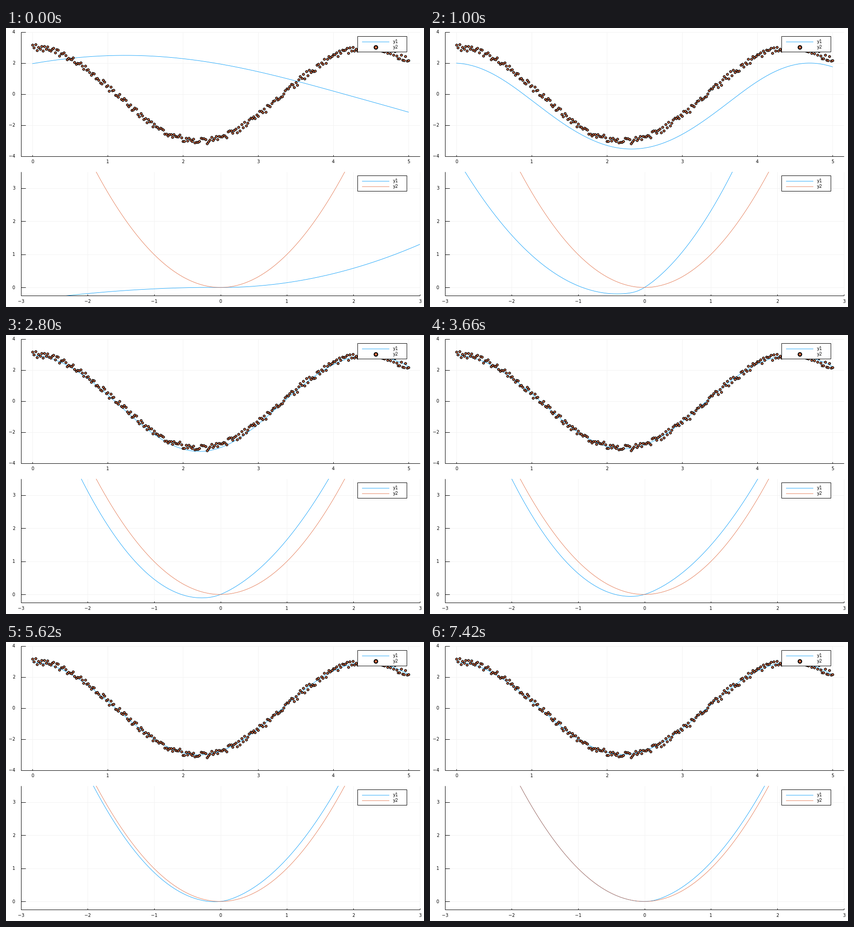
A matplotlib script for the animation above (7440 ms loop, 917x611 px).

```python
import numpy as np
import matplotlib.pyplot as plt
from matplotlib.animation import FuncAnimation
from matplotlib.collections import LineCollection
from matplotlib.patches import Rectangle

W, H, DPI = 917, 611, 64
PX = 72 / DPI
BLUE, ORANGE, GRID = "#009afa", "#e26f46", "#f2f2f2"
LEFT, RIGHT = 33, 908
CURVE_W = 0.85 * PX
TICK_MS, TICKS = 20, 372
STEPS = 160

plt.rcParams["font.family"] = "DejaVu Sans"
fig = plt.figure(figsize=(W / DPI, H / DPI), dpi=DPI, facecolor="white")
ax = fig.add_axes([0, 0, 1, 1])
ax.set_xlim(0, W)
ax.set_ylim(H, 0)
ax.axis("off")


class Panel:
    """A plot area in pixel coordinates with its own data scale."""

    def __init__(self, top, bottom, x0, x_unit, y0, y_unit):
        self.top, self.bottom = top, bottom
        self.x0, self.x_unit, self.y0, self.y_unit = x0, x_unit, y0, y_unit
        self.clip = Rectangle((LEFT, top), RIGHT - LEFT, bottom - top,
                              transform=ax.transData)

    def x(self, v):
        return self.x0 + self.x_unit * np.asarray(v)

    def y(self, v):
        return self.y0 - self.y_unit * np.asarray(v)

    def frame(self, xticks, yticks):
        xs = [self.x(v) for v in xticks]
        ys = [self.y(v) for v in yticks]
        segments([[(x, self.top), (x, self.bottom)] for x in xs]
                 + [[(LEFT, y), (RIGHT, y)] for y in ys], GRID, 1)
        segments([[(LEFT, self.top), (LEFT, self.bottom)],
                  [(LEFT, self.bottom), (RIGHT, self.bottom)]]
                 + [[(x, self.bottom), (x, self.bottom - 3)] for x in xs]
                 + [[(LEFT, y), (LEFT + 10, y)] for y in ys], "black", 2)
        for x, v in zip(xs, xticks):
            label(x, self.bottom + 12, v, "center")
        for y, v in zip(ys, yticks):
            label(20, y, v, "right")

    def curve(self, color, z):
        line, = ax.plot([], [], color=color, lw=CURVE_W, zorder=z)
        line.set_clip_path(self.clip)
        return line

    def legend(self, draw_second):
        y = round(self.top + 8.6)
        ax.add_patch(Rectangle((771, y), 108, 34.4, fc="white",
                               ec="black", lw=PX, zorder=8))
        key_line(y + 11.7, BLUE)
        draw_second(y + 23.5)
        label(849, y + 11.7, "y1", "left")
        label(849, y + 23.5, "y2", "left")


def segments(parts, color, z):
    ax.add_collection(LineCollection(parts, colors=color, linewidths=PX,
                                     zorder=z), autolim=False)


def label(x, y, text, align):
    ax.text(x, y + 3.5, str(text).replace("-", "\u2212"), ha=align,
            va="baseline", fontsize=9.6 * PX, zorder=10)


def dots(x, y, size, edge, z):
    ax.plot(x, y, "o", ms=size * PX, mfc=ORANGE, mec="black",
            mew=edge * PX, zorder=z)


def key_line(y, color):
    ax.plot([781, 840], [y, y], color=color, lw=CURVE_W, zorder=9)


upper = Panel(9, 281, 58, 165, 145, 34)
lower = Panel(314.7, 586.3, 470.5, 145.83, 568.2, 72.4)
upper.frame(range(6), range(-4, 5, 2))
lower.frame(range(-3, 4), range(4))

# Noisy samples of the true oscillation.
t = np.linspace(0, 5, 251)
noise = np.random.default_rng(4).uniform(-0.21, 0.21, t.size)
dots(upper.x(t), upper.y(3 * np.cos(np.sqrt(2) * t) + noise), 4.7, 1.4, 5)

xs = np.linspace(-3, 3, 601)
lower.curve(ORANGE, 5).set_data(lower.x(xs), lower.y(xs ** 2))
upper.legend(lambda y: dots([810.5], [y], 7.6, 2.2, 9))
lower.legend(lambda y: key_line(y, ORANGE))

# Training runs through four stages; the last one settles with an ease-out.
steps = np.arange(1, STEPS + 1)
stage = np.interp(steps, [1, 20, 44, 80, STEPS], range(5))
stage = np.where(stage > 3, 4 - np.clip(4 - stage, 0, 1) ** 1.5, stage)


def track(*values):
    return np.interp(stage, range(5), values)


# The fitted potential is a*x^2 + b*x on either side of a soft joint.
a_left = track(-0.0475, 0.65, 1.08, 1.11, 1)
b_left = track(0, 0.55, 0.75, 0.46, 0)
a_right = track(0.145, 1.03, 0.775, 0.785, 0.91)
b_right = track(0, 1.37, 1.03, 0.715, 0.31)
joint = np.linspace(-0.14, 0.125, STEPS)
start = np.clip(2 + 0.038 * (steps - 23), 1.97, 2.96)
speed = np.interp(steps, [1, 18, STEPS], [0.83, -0.22, -0.1])


def slope(x):
    """Gradient of every step's potential at x."""
    blend = 0.5 + 0.5 * np.tanh((x - joint) / 0.1)
    left = 2 * a_left * x + b_left
    right = 2 * a_right * x + b_right
    return left + (right - left) * blend


def simulate(dt=0.01):
    """Leapfrog paths of a unit mass rolling in each step's potential."""
    x, v = start.copy(), speed.copy()
    path = [x.copy()]
    for i in range(1, 2 * t.size - 1):
        v -= slope(x) * dt / 2
        x += v * dt
        v -= slope(x) * dt / 2
        if i % 2 == 0:
            path.append(x.copy())
    return np.array(path).T


def potentials():
    g = slope(xs[:, None]).T
    area = np.cumsum((g[:, 1:] + g[:, :-1]) / 2, axis=1) * (xs[1] - xs[0])
    v = np.hstack([np.zeros((STEPS, 1)), area])
    return v - v[:, [xs.size // 2]]


paths, wells = simulate(), potentials()
path_line = upper.curve(BLUE, 4)
well_line = lower.curve(BLUE, 4)


def update(tick):
    # Steps come in threes: two short ones, then one held for five ticks.
    group, part = divmod(tick + 1, 7)
    k = 3 * group + min(part, 2) - 1
    path_line.set_data(upper.x(t), upper.y(paths[k]))
    well_line.set_data(lower.x(xs), lower.y(wells[k]))
    return path_line, well_line


anim = FuncAnimation(fig, update, frames=TICKS, interval=TICK_MS,
                     repeat=True, repeat_delay=0)
plt.show()
```
